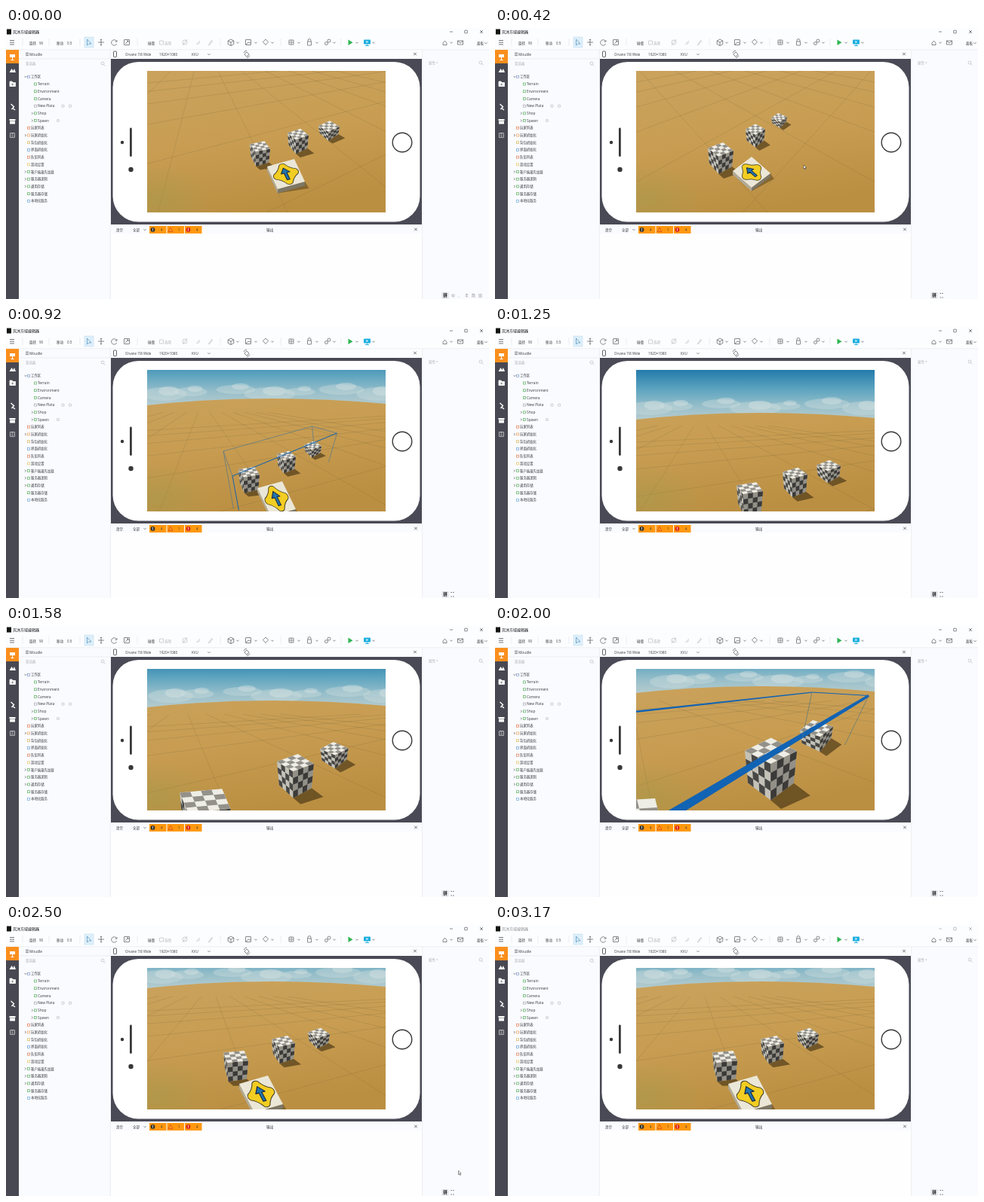
An HTML page that plays this animation: 640 px wide and 360 px high, repeating every 3.26 s.

```html
<!DOCTYPE html>
<html lang="zh">
<head>
<meta charset="utf-8">
<title>场景编辑器</title>
<style>
html, body { margin: 0; width: 100%; height: 100%; overflow: hidden; background: #fcfdff; }
svg { display: block; width: 640px; height: 360px; font-family: "Open Sans", "Noto Sans CJK SC", "Noto Sans CJK", sans-serif; }
</style>
</head>
<body>
<svg id="stage" viewBox="0 0 640 360" xmlns="http://www.w3.org/2000/svg">
  <defs>
    <clipPath id="view"><rect x="187" y="57" width="316" height="188"/></clipPath>
    <linearGradient id="sky" x1="0" y1="0" x2="0" y2="1">
      <stop offset="0" stop-color="#1d76a8"/><stop offset=".4" stop-color="#5fa5c0"/>
      <stop offset=".7" stop-color="#98bfca"/><stop offset="1" stop-color="#bdcfd0"/>
    </linearGradient>
    <linearGradient id="sand" gradientUnits="userSpaceOnUse" x1="300" y1="57" x2="330" y2="245">
      <stop offset="0" stop-color="#caa25c"/><stop offset=".5" stop-color="#c89d52"/><stop offset="1" stop-color="#bb8f42"/>
    </linearGradient>
    <radialGradient id="tint"><stop offset="0" stop-color="#a39a4c" stop-opacity=".5"/><stop offset="1" stop-color="#a39a4c" stop-opacity="0"/></radialGradient>
  </defs>
  <g id="chrome"></g>
  <g id="scene" clip-path="url(#view)"></g>
  <g id="overlay"></g>
</svg>
<script>
const $ = id => document.getElementById(id);
const INK = '#3c3c40', SOFT = '#b0b0b6', GREEN = '#6fb873', LINE = '#e2e4ea', PANEL = '#fafbff';

// markup helpers
const rect = (x, y, w, h, fill, extra = '') => `<rect x="${x}" y="${y}" width="${w}" height="${h}" fill="${fill}" ${extra}/>`;
const dot = (x, y, r, fill, extra = '') => `<circle cx="${x}" cy="${y}" r="${r}" fill="${fill}" ${extra}/>`;
const path = (d, stroke, width = .6, fill = 'none', extra = '') =>
  `<path d="${d}" stroke="${stroke}" stroke-width="${width}" fill="${fill}" ${extra}/>`;
const label = (x, y, str, size = 4.5, fill = INK, extra = '') =>
  `<text x="${x}" y="${y + size * .36}" font-size="${size}" fill="${fill}" ${extra}>${str}</text>`;
const chevron = (x, y, c = INK) => path(`M${x - 1.6} ${y - .8}l1.6 1.6l1.6 -1.6`, c);
const cross = (x, y, r = 1.8, c = INK) => path(`M${x - r} ${y - r}l${2 * r} ${2 * r}m0 ${-2 * r}l${-2 * r} ${2 * r}`, c, .7);
const ring = (x, y, r, c = INK) => dot(x, y, r, 'none', `stroke="${c}" stroke-width=".6"`);
const lens = (x, y) => ring(x, y, 2, SOFT) + path(`M${x + 1.5} ${y + 1.5}l2 2`, SOFT);
const outline = (x, y, c = INK, s = 6) => rect(x - s / 2, y - s / 2, s, s, 'none', `rx=".4" stroke="${c}" stroke-width=".6"`);

function toolbar() {
  let s = path('M5 16.5h6m-6 2.7h6m-6 2.7h6', INK, .7);
  s += label(31, 20, '旋转') + label(44, 20, '90') + label(67, 20, '移动') + label(81, 20, '0.5');
  s += rect(104, 12, 12, 14, '#deeffa', 'stroke="#b8d9ee" stroke-width=".5"');
  s += path('M107.500 15v8l2 -2l3.500 0z', '#4c8fb8', .7);
  s += path('M122 19h8m-4 -4v8m-1.200 -7l1.200 -1.200l1.200 1.200m-2.400 6l1.200 1.200l1.200 -1.200', INK);
  s += path('M146.500 17.500a3.700 3.700 0 1 0 .2 3.500m.3 -5v2.200h-2.500', INK);
  s += outline(160, 19, INK, 7) + path('M158 21l4 -4m-2 0h2v2', INK);
  for (const x of [22, 57, 98, 174, 284, 364, 444]) s += path(`M${x} 14v10`, LINE);
  s += label(188, 20, '碰撞') + outline(206, 19.500, SOFT, 5) + label(210, 20, '选项', 4.5, SOFT);
  s += ring(237, 19, 3, SOFT) + path('M234 23l6 -8', SOFT);
  s += path('M252 22l5 -5m-3 5l3 -3m11 4l5 -7m-4 7l5 -6', SOFT);
  s += path('M298 15l3.800 2v4.500l-3.800 2l-3.800 -2v-4.500zm-3.800 2l3.800 2l3.800 -2m-3.800 2v4.500', INK);
  s += outline(321, 19, INK, 7) + path('M318 22l3 -3l3 1', INK);
  s += path('M344 15l3.500 3.500l-3.500 4l-3.500 -4z', INK);
  s += outline(378, 19) + path('M375 19h6m-3 -3v6', INK, .5);
  s += outline(402, 20.500, INK, 5) + path('M400 18v-1.500a2 2 0 0 1 4 0v1.500', INK);
  s += ring(424.500, 20.500, 2) + ring(428, 17, 2);
  for (const x of [307, 331, 353, 388, 412, 435, 465, 487]) s += chevron(x, 19.500);
  s += '<path d="M453.500 15.500l6 3.800l-6 3.800z" fill="#2fb552"/>';
  s += rect(474, 15.500, 9, 6, '#1fb0e0', 'rx=".8"') + path('M478.500 21.500v2m-2.500 0h5', '#1fb0e0', .9);
  s += '<path d="M477.500 17l2.500 1.500l-2.500 1.500z" fill="#fff"/>';
  s += path('M579 20l2.500 -3l2.500 3v2.500h-5z', INK) + chevron(590, 19.500);
  s += path('M598.500 17h7v5h-7zl3.500 3l3.500 -3', INK);
  return s + label(624, 20, '面板') + chevron(636, 20);
}

function sidebar() {
  let s = rect(0, 29, 17, 331, '#484852') + rect(0, 29, 17, 18, '#fb8f1d');
  s += rect(5, 35, 7, 4, '#fff') + path('M8.500 39v3.500m-2 0h4', '#fff', 1);
  s += '<path d="M4.500 59l3 -5l2 3l1.500 -3l2 5z" fill="#fff"/>';
  s += path('M5 71h3l1 1.500h3.500v5h-7.500z', '#fff', .8, '#fff') + path('M8.700 73.500v3m-1.500 -1.500h3', '#484852');
  s += path('M6.500 101l4 3.500l-3 3.500m2 -1l2.500 2', '#fff', 1.4);
  s += rect(5, 123.500, 7, 4, '#fff') + rect(4.500, 121, 8, 2, '#fff');
  return s + outline(8.500, 142.500, '#fff') + path('M7 141h3m-3 2.500h3', '#fff');
}

function tree() {
  const rows = ['-工作区', '..Terrain', '..Environment', '..Camera', '..New Plata', '.+Shop', '.+Spawn', '玩家列表',
    '+玩家初始化', '背包初始化', '界面初始化', '队伍列表', '游戏设置', '+客户端最先加载', '+服务器逻辑', '+通用存储', '服务器存储', '本地化服务'];
  const tints = ['#8da6cf', GREEN, GREEN, GREEN, SOFT, GREEN, GREEN, '#e88a60',
    '#efb070', '#dcc06a', '#79abd8', '#e08a66', '#e4cf78', GREEN, GREEN, GREEN, GREEN, '#7fb3dc'];
  let s = path('M26 33h4m-4 1.800h4m-4 1.800h4', INK, .6) + label(31, 35, 'Moudle', 4.8);
  s += label(26, 47.500, '筛选器', 4.4, SOFT) + lens(128, 47);
  rows.forEach((row, i) => {
    const y = 64.800 + i * 9.71, deep = row[0] === '.', name = row.replace(/^[-+.]+/, ''), x = deep ? 42 : 33;
    s += rect(x - 4.600, y - 1.500, 3, 3, PANEL, `stroke="${tints[i]}" stroke-width=".8"`);
    s += label(x, y, name, deep ? 4.8 : 4.4);
    if (row[0] === '-') s += chevron(26, y);
    if (/^\.?\+/.test(row)) s += path(`M${deep ? 34 : 25} ${y - 1.500}l1.500 1.500l-1.500 1.500`, INK);
  });
  return s + outline(75.500, 103.700, SOFT, 3) + outline(85, 103.700, SOFT, 3) + outline(69, 123, SOFT, 2.8);
}

function phone() {
  let s = rect(139, 41, 412, 220, '#4a4a56') + rect(141.500, 45, 407, 212.500, '#fff', 'rx="34"');
  s += rect(164, 132.500, 2.8, 38.500, '#38383a', 'rx="1.400"') + dot(154, 152, 2.2, '#38383a') + dot(165.500, 188, 3.2, '#38383a');
  s += dot(525, 152, 12.800, '#fff', 'stroke="#38383a" stroke-width="1.400"');
  s += rect(142.500, 31, 4, 7.500, 'none', `rx=".7" stroke="${INK}" stroke-width=".8"`);
  s += label(158, 35, 'Orvane 7/8 Wide', 4.4) + label(203, 35, '1920×1080', 4.7) + label(246, 35, 'KVU', 4.5) + chevron(269, 35);
  s += `<g transform="rotate(-40 319 35)">${outline(319, 35, INK, 4.5)}</g>` + path('M315 33a4.500 4.500 0 0 1 4 -3m4 6.500a4.500 4.500 0 0 1 -4 3', INK);
  return s + cross(542, 34.500);
}

function consolePanel() {
  let s = rect(139, 261, 412, 12, PANEL) + rect(139, 273, 412, 87, '#fefefe');
  s += label(146, 268, '清空') + label(168, 268, '全部') + chevron(184, 268) + label(345, 268, '输出', 4.8) + cross(543, 267.500);
  for (const x of [190, 213.500, 237]) s += rect(x, 263, 22.500, 10, '#ff980f');
  s += dot(194.500, 268, 2.9, '#37342b') + path('M218 265l3 5.500h-6z', '#e2551c', .9);
  s += dot(241.500, 268, 2.9, '#d9261c') + path('M194.500 266v2.500m0 .7v.8m47 -4v2.500m0 .7v.8', '#fff', .8);
  return s + label(205, 268, '4') + label(228, 268, '1') + label(252, 268, '4');
}

$('chrome').innerHTML = rect(0, 0, 640, 360, '#fcfdff') + rect(17, 29, 121, 331, PANEL) + rect(552, 29, 88, 331, PANEL)
  + path('M0 28.800h640M138.300 29v331M551.700 29v331M139 260.800h412M139 273h412M17 41h121', LINE)
  + rect(1, 1.5, 6, 7, '#14140f') + toolbar() + sidebar() + tree() + phone() + consolePanel()
  + label(560, 46.500, '属性 ×', 4.4, SOFT) + lens(629, 46);

// camera keys: time, horizon, turn, flatness, then x / y / width of three cubes, then three plate corners
const KEYS = [
  [0, 15, 22, .52, 336.5, 167, 27, 387, 150.5, 28, 428, 136.5, 28, 346, 184, 382, 174, 396, 204],
  [420, 5, 0, .55, 299, 173, 34, 345, 143, 26, 376.5, 123, 21, 315, 190, 340, 171, 365, 193],
  [920, 99, 22, .5, 322, 203, 28, 371.5, 179.5, 25, 406.5, 162.5, 23, 333, 214, 366, 205, 384, 242],
  [1250, 118, 25, .45, 337.5, 228, 35, 397.5, 206.5, 33, 442, 192, 32, 335, 264, 380, 255, 405, 300],
  [2000, 84, 5, .5, 170, 296, 108, 365.5, 190, 69, 426, 146, 44, 150, 420, 220, 400, 260, 470],
  [2500, 79, 25, .48, 304.5, 187.5, 33, 367.5, 165.5, 31, 414.5, 150.5, 29, 309, 211, 347, 200, 367, 238]
];
const ASPECT = [1.24, 1.2, .95], FOCAL = 200, MID = 345, RAD = Math.PI / 180;

function cameraAt(t) {
  const last = KEYS[KEYS.length - 1];
  if (t >= last[0]) return last;
  const i = KEYS.findIndex(k => k[0] > t), a = KEYS[i - 1], b = KEYS[i];
  const p = (t - a[0]) / (b[0] - a[0]);
  return a.map((v, j) => v + (b[j] - v) * p);
}

const num = v => v.toFixed(1);
const poly = pts => 'M' + pts.map(p => num(p[0]) + ' ' + num(p[1])).join('L') + 'Z';
const fillPoly = (pts, fill, extra = '') => `<path d="${poly(pts)}" fill="${fill}" ${extra}/>`;

// face given by its four corners in order
function checkered([p, q, r, s], light, dark) {
  const at = (u, v) => [0, 1].map(k => (p[k] * (1 - u) + q[k] * u) * (1 - v) + (s[k] * (1 - u) + r[k] * u) * v);
  let d = '';
  for (let n = 0; n < 16; n++) {
    const u = (n & 3) / 4, v = (n >> 2) / 4;
    if ((n + (n >> 2)) & 1) d += poly([at(u, v), at(u + .25, v), at(u + .25, v + .25), at(u, v + .25)]);
  }
  return fillPoly([p, q, r, s], light) + `<path d="${d}" fill="${dark}"/>`;
}

// the lower ring is smaller and seen from more above than the upper one
function cube(x, y, w, aspect, turn, flat) {
  const h = w * aspect, small = .88, steep = 1.5;
  const spin = Math.max(-40, Math.min(40, turn - .8 * Math.atan((x - MID) / FOCAL) / RAD)) * RAD;
  const radius = w / 2 / Math.cos(spin), topY = y - h / 2 + w / 2 * flat;
  const lowY = y + h / 2 - w / 2 * flat * small * steep;
  const corner = (i, size, cy, squash) => {
    const a = spin + i * Math.PI / 2;
    return [x + Math.cos(a) * radius * size, cy + Math.sin(a) * radius * size * squash];
  };
  const [right, front, left, back] = [0, 1, 2, 3].map(i => corner(i, 1, topY, flat));
  const [r, f, l] = [0, 1, 2].map(i => corner(i, small, lowY, flat * steep));
  const shade = fillPoly([f, [f[0] + w * .2, f[1] + h * .14], [r[0] + w * .32, r[1] + h * .2], r], '#4f3b18', 'opacity=".7"');
  return shade + checkered([left, front, f, l], '#c4c2b8', '#474746')
    + checkered([front, right, r, f], '#939088', '#3b3a38') + checkered([back, right, front, left], '#eeede6', '#93918a');
}

function ground(horizon, turn, bx, by, bw) {
  const toWorld = (x, y) => { const z = FOCAL / (y - horizon); return [(x - MID) * z / FOCAL, z]; };
  const base = toWorld(bx, by + bw * .4), cell = bw / 1.25 * base[1] / FOCAL * 4.5;
  const near = FOCAL / (300 - horizon);
  let d = '';
  for (const angle of [turn - 45, turn + 45]) {
    const dir = [Math.sin(angle * RAD), Math.cos(angle * RAD)];
    if (dir[1] < .05) continue;
    for (let i = -5; i < 5; i++) {
      const off = (i + .5) * cell, px = base[0] + dir[1] * off, pz = base[1] - dir[0] * off;
      const ends = [near, near * 14].map(z => {
        const X = px + dir[0] * (z - pz) / dir[1];
        return num(MID + FOCAL * X / z) + ' ' + num(horizon + FOCAL / z);
      });
      d += 'M' + ends.join('L');
    }
  }
  return path(d, '#65562f', .5, 'none', 'opacity=".35"');
}

function sky(h, turn) {
  let s = rect(187, h - 64, 316, 74, 'url(#sky)');
  [[205, 30, 9], [240, 22, 6], [300, 26, 6], [345, 34, 9], [385, 20, 5], [440, 30, 7], [488, 28, 9]].forEach(([x, rx, ry], i) => {
    const cx = x + (25 - turn) * 1.5, cy = h - 10 - (i % 3) * 3;
    s += `<ellipse cx="${cx}" cy="${cy}" rx="${rx}" ry="${ry}" fill="#cddbdc" opacity=".4"/>`;
    s += `<ellipse cx="${cx + 6}" cy="${cy - 4}" rx="${rx * .45}" ry="${ry * .7}" fill="#dde5e3" opacity=".4"/>`;
  });
  return rect(187, 57, 316, 188, '#1d76a8') + s;
}

function plate(p) {
  const [L, T, R] = [p.slice(0, 2), p.slice(2, 4), p.slice(4, 6)];
  const B = [L[0] + R[0] - T[0], L[1] + R[1] - T[1]];
  const thick = Math.hypot(T[0] - L[0], T[1] - L[1]) * .15;
  const down = q => [q[0], q[1] + thick];
  const m = [T[0] - L[0], T[1] - L[1], B[0] - L[0], B[1] - L[1], ...L].map(num).join(' ');
  return fillPoly([down(B), [R[0] + thick, R[1] + thick * 1.6], R, B], '#4f3b18', 'opacity=".5"')
    + fillPoly([L, B, down(B), down(L)], '#b0aa98') + fillPoly([B, R, down(R), down(B)], '#7d7766') + fillPoly([L, T, R, B], '#ebe7d8')
    + `<g transform="matrix(${m})" stroke-linejoin="round">`
    + path('M.4 .09Q.5 .01 .6 .09Q.7 .3 .91 .4Q.99 .5 .91 .6Q.7 .7 .6 .91Q.5 .99 .4 .91Q.3 .7 .09 .6Q.01 .5 .09 .4Q.3 .3 .4 .09Z', '#4a4120', .025, '#f2cd22')
    + path('M.5 .24L.66 .45H.55V.74H.45V.45H.34Z', '#1c2c3c', .03, '#2274b0') + '</g>';
}

// selection box, given relative to the middle cube
const attach = (x, y, k, body) => `<g transform="translate(${num(x)} ${num(y)}) scale(${k.toFixed(3)})">${body}</g>`;
const FAR_BOX = path('M-83.500 -14.500L34 -47.500L67 -38.500M-71.500 18.500L-83.500 -14.500L-70 62M34 -47.500L37 -19M67 -38.500L56 0', '#54788c', .7)
  + path('M-71.500 18.500L67 -38.500M-71.500 18.500L-63 64', '#1f68a8', 1.1);
const NEAR_BOX = '<path d="M-179 -77.500L54.500 -102.500V-101.300L-179 -75ZM-146 61L129 -99L130.500 -96L-122 61Z" fill="#1163b4"/>'
  + path('M54.500 -102L129.500 -97.500', '#1163b4', 1.1) + path('M129.500 -97L98 -32M54.500 -102L42 -42', '#56777a', .7);

function drawScene(t) {
  const [, h, turn, flat, ...rest] = cameraAt(t), [bx, by, bw] = rest.slice(3, 6);
  let s = sky(h, turn) + path(`M187 ${h + 5}Q340 ${h - 12} 503 ${h + 3}V245H187Z`, 'none', 0, 'url(#sand)');
  s += ground(h, turn, bx, by, bw);
  s += '<ellipse cx="200" cy="228" rx="75" ry="48" fill="url(#tint)"/>';
  for (let i = 2; i >= 0; i--) s += cube(...rest.slice(i * 3, i * 3 + 3), ASPECT[i], turn, flat);
  s += plate(rest.slice(9));
  if (t > 700 && t < 1120) s += attach(bx, by, bw / 25, FAR_BOX);
  if (t > 1740 && t < 2300) s += attach(bx, by, bw / 69, NEAR_BOX);
  $('scene').innerHTML = s;
}

function drawOverlay(t) {
  const faded = t > 3060, ink = faded ? '#9a9a9e' : INK;
  let s = label(9, 5.300, '岚沐方域编辑器', 5, faded ? '#8e8e92' : '#111114', 'font-weight="500"');
  s += path('M588 5h4', ink) + outline(609.500, 5, ink, 3.6) + cross(630, 5, 1.8, ink);
  s += rect(577.500, 351, 9, 8.500, '#e2e3e8') + label(579.200, 355.200, '拼', 5.5, '#111114', 'font-weight="700"');
  if (t < 170) ['中', '、', '半', '简', '田'].forEach((c, i) => s += label(590 + i * 9, 355.300, c, 4.8, '#8a8a90'));
  else s += path('M589.500 352.500h1.300m1.500 0h1.300m-4.100 5.500h1.300m1.500 0h1.300', '#55555a', 1.1);
  let spot = null;
  if (t > 240 && t < 590) spot = [409, 182];
  if (t > 2320 && t < 2930) {
    const p = Math.min(1, (t - 2320) / 180), e = 1 - (1 - p) ** 2;
    spot = [460 + 139.500 * e, 220 + 106.500 * e];
  }
  if (spot) s += path(`M${num(spot[0])} ${num(spot[1])}v5l1.200 -1l.9 2l.8 -.4l-.9 -1.900h1.600z`, '#222', .5, '#fff');
  $('overlay').innerHTML = s;
}

const LOOP = 3260, STEP = 250 / 3;
let shown = -1;
function update(now) {
  const index = Math.min(38, Math.floor((now % LOOP + 3.4) / STEP));
  if (index !== shown) {
    shown = index;
    const t = Math.round(index * STEP / 10) * 10;
    drawScene(t);
    drawOverlay(t);
  }
}
const start = performance.now();
function tick() {
  update(performance.now() - start);
  requestAnimationFrame(tick);
}
tick();
</script>
</body>
</html>
```
